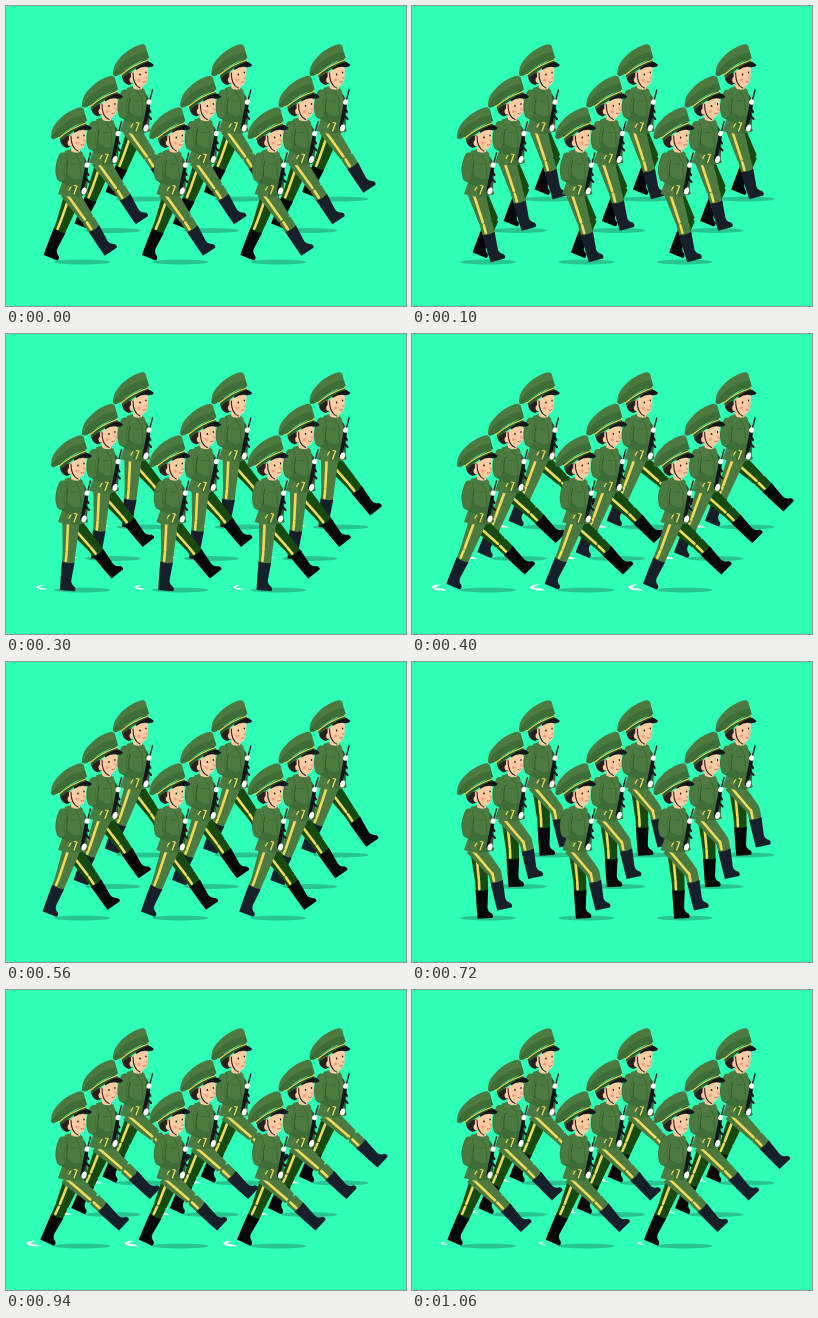
Recreate the animation shown at these times as an HTML page with a canvas. Size 400x300 px, loop 1.08 s.

```html
<!DOCTYPE html>
<html>
<head>
<meta charset="utf-8">
<style>
html, body { margin: 0; width: 100%; height: 100%; overflow: hidden; background: #30ffb7; }
canvas { display: block; width: 400px; height: 300px; }
</style>
</head>
<body>
<canvas id="stage"></canvas>
<script>
const LOOP = 1080, HALF = 570, STEP = 540;
const THIGH = 28, SHIN = 31, HIP_Y = 189;
const GREEN = '#4c7a40', DARK = '#2b5a2c', MID = '#3f6d38', GOLD = '#f0da58',
      BLACK = '#10161c', HAIR = '#2b2020', SKIN = '#ffcba0', WHITE = '#fff';
const NEAR = { hip: 65, cloth: GREEN, boot: '#17202a' };
const FAR = { hip: 67, cloth: '#174a10', boot: '#05080a' };

const stage = document.getElementById('stage');
const g = stage.getContext('2d');
const ratio = window.devicePixelRatio || 1;
stage.width = 400 * ratio;
stage.height = 300 * ratio;

// Ankle paths over one step: [phase, x, y]
const swingPath = [[0, 45, 245], [80, 63, 243], [159, 89, 241], [190, 101, 239],
  [286, 106, 236], [379, 112, 232], [450, 112, 232], [519, 109, 233], [530, 103, 239], [540, 100, 241]];
const plantPath = [[0, 100, 241], [30, 94, 247], [159, 71, 250], [190, 66, 250],
  [286, 60, 250], [379, 42, 246], [519, 43, 246], [540, 45, 245]];
// Dust: [phase, x, size]
const dustPath = [[0, 37, 0], [165, 34, 0], [190, 31, .8], [286, 35, .8], [379, 26, 1.1],
  [519, 32, .6], [530, 31, 0], [540, 31, 0]];

function at(path, p) {
  const i = Math.max(1, path.findIndex(k => k[0] >= p));
  const a = path[i - 1], b = path[i];
  const u = (p - a[0]) / (b[0] - a[0]);
  return [1, 2].map(n => a[n] + (b[n] - a[n]) * u);
}

const cache = {};
const shape = d => cache[d] = cache[d] || new Path2D(d);

function fill(color, d) {
  g.fillStyle = color;
  g.fill(shape(d));
}

function line(color, width, d) {
  g.strokeStyle = color;
  g.lineWidth = width;
  g.lineCap = g.lineJoin = 'round';
  g.stroke(shape(d));
}

function oval(color, x, y, rx, ry = rx, turn = 0) {
  g.fillStyle = color;
  g.beginPath();
  g.ellipse(x, y, rx, ry, turn, 0, 7);
  g.fill();
}

function place(x, y, angle, draw) {
  g.save();
  g.translate(x, y);
  g.rotate(angle);
  draw();
  g.restore();
}

// Two-bone leg: the knee bends forward, the thigh gives a little at full reach
function leg([ax, ay], { hip, cloth, boot }) {
  const dx = ax - hip, dy = ay - HIP_Y, d = Math.hypot(dx, dy);
  const thigh = Math.max(THIGH, d - SHIN + .01);
  const aim = Math.atan2(-dx, dy);
  const upper = aim - Math.acos((thigh ** 2 + d * d - SHIN ** 2) / (2 * thigh * d));
  const lower = aim + Math.acos((SHIN ** 2 + d * d - thigh ** 2) / (2 * SHIN * d));
  const kx = hip - Math.sin(upper) * thigh, ky = HIP_Y + Math.cos(upper) * thigh;
  place(kx, ky, lower, () => {
    fill(cloth, 'M-6.5 -1 Q0 -6 6.5 -1 L6 13 H-6Z');
    fill(boot, 'M-6.3 9 Q0 11 6.3 9 L4.8 27 Q5 31 9 33 Q11 36 9 37.5 H-5.5 Q-6 30 -6.3 9Z');
  });
  place(hip, HIP_Y, upper, () => fill(cloth, 'M-9 -5 H9 L6.5 29 Q0 33 -6.5 29Z'));
  place(kx, ky, lower, () => line(GOLD, 2.6, 'M-2.5 0 V8'));
  place(hip, HIP_Y, upper, () => line(GOLD, 2.6, 'M-3 -4 L-2.5 28'));
}

function torso() {
  fill(DARK, 'M74 148 Q82 152 82 164 L81 184 H70Z');
  fill(GREEN, 'M59 145 Q70 140 77 147 Q80 162 78 175 L82 188 Q67 194 52 188 L57 174 Q55 156 59 145Z');
  fill(MID, 'M63 174 L78 172 L82 188 Q74 191 66 190Z');
  line(MID, 1.2, 'M69 147 L74 156 L75 172 M66 158 H71');
  line(GOLD, 1.3, 'M64 178 L70 180 M68 188 L71 180 M63 184 L66 179');
  // Near arm
  line(MID, 9, 'M57 151 Q52 163 55 171 L65 176');
  line(GREEN, 7.5, 'M57 151 Q52 163 55 171');
  line(DARK, 1, 'M62 155 Q60 163 61 170');
  // Rifle and gloves
  line(BLACK, 1.3, 'M84.5 147 L81 160');
  line(BLACK, 3.4, 'M80.5 162 L76 185');
  line(BLACK, 2, 'M79 172 L83 176 M80 165 L82.5 169');
  oval(WHITE, 81, 159, 2.4, 2.8, .4);
  oval(WHITE, 78, 185, 2.4, 3.6, .3);
}

function head() {
  fill(SKIN, 'M65 139 H74 V146 Q69 148 65 145Z');
  fill(HAIR, 'M54 132 Q54 140 61 142 L67 139 L68 128Z');
  fill(SKIN, 'M63 130 L79 119 Q81 126 80 133 Q80 143 72 144 Q65 143 63 136Z');
  oval(SKIN, 64, 137, 2.4, 3);
  oval('#ff9d86', 71, 137, 2, 1.5);
  oval('#ff9d86', 78.5, 135, 1.3, 1.4);
  oval(BLACK, 72, 131.5, .8, 1.1);
  oval(BLACK, 78, 129.5, .7, 1);
  line('#a85d4d', .8, 'M75 139 Q76.5 140 78 138.5');
  line(HAIR, 1.1, 'M65 130 Q65 142 72 145');
  // Peaked cap
  fill(DARK, 'M52 130 L79 115 L82 121 Q68 123 55 135Z');
  fill(BLACK, 'M68 125 Q76 119 82 119 L86 122 Q84 125 79 124 Q74 123 68 127Z');
  fill(GREEN, 'M45 131 Q45 123 50 117 Q59 106 71 102 Q77 100 78 104 L81 115 Q66 119 52 131 Q46 135 45 131Z');
  fill(MID, 'M45 131 Q51 121 62 115 Q71 110 79 109 L81 115 Q66 119 52 131 Q46 135 45 131Z');
  line(GOLD, 1.3, 'M53 132 Q65 122 80 117');
}

function dust(p) {
  const [x, size] = at(dustPath, p);
  place(x, 253, 0, () => {
    g.scale(size, size);
    fill(WHITE, 'M-6 0 Q-3 -3 3 -2 Q-2 -1 -2 1 Q4 1 8 3 Q-4 4 -6 0Z');
  });
}

function soldier(p, farSwings) {
  const swing = at(swingPath, p), plant = at(plantPath, p);
  oval('#27c590', 76, 256, 28, 2.4);
  dust(p);
  leg(farSwings ? swing : plant, FAR);
  leg(farSwings ? plant : swing, NEAR);
  torso();
  head();
}

function frame() {
  const t = performance.now() % LOOP;
  const first = t < HALF;
  const p = first ? t / HALF * STEP : (t - HALF) / (LOOP - HALF) * STEP;
  g.setTransform(ratio, 0, 0, ratio, 0, 0);
  g.fillStyle = '#30ffb7';
  g.fillRect(0, 0, 400, 300);
  for (let row = 2; row >= 0; row--) {
    for (let col = 0; col < 3; col++) {
      g.save();
      g.translate(col * 98.3 + row * 31, row * -31.5);
      soldier(p, first);
      g.restore();
    }
  }
  requestAnimationFrame(frame);
}
frame();
</script>
</body>
</html>
```
